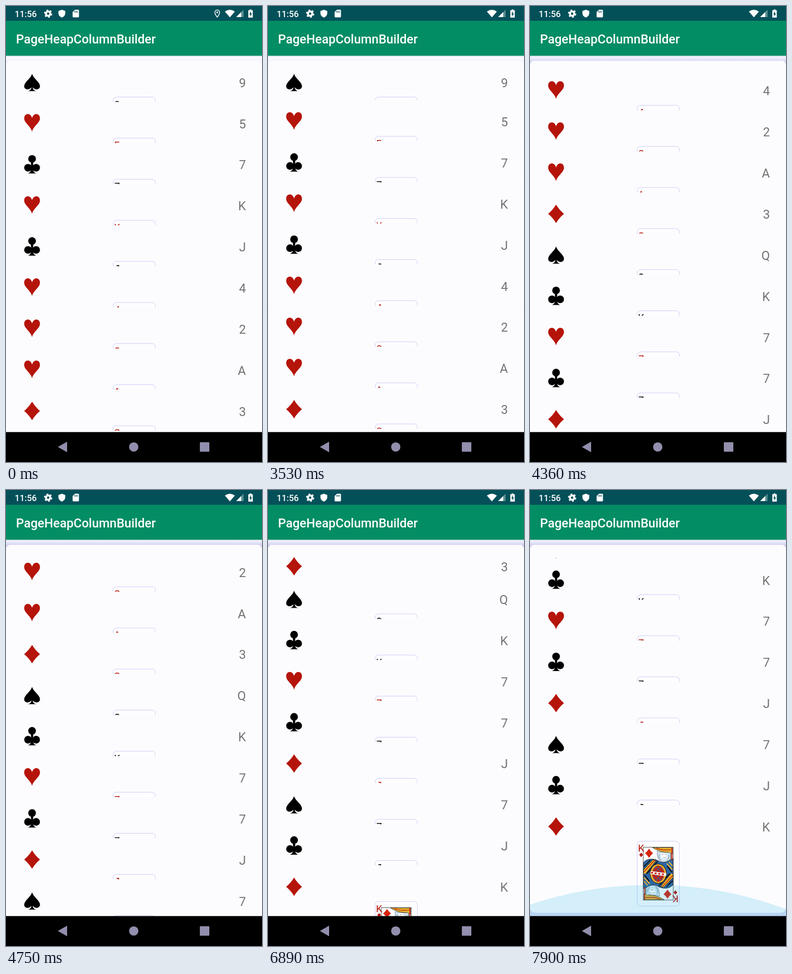
Animation, 486 px wide and 864 px high, one loop 8 s. Source, as an HTML page:

```html
<!DOCTYPE html>
<html lang="en">
<head>
<meta charset="utf-8">
<title>Card list</title>
<style>
  html, body { margin: 0; width: 100%; height: 100%; overflow: hidden; background: #000; }
  svg { display: block; width: 100vw; height: 100vh; }
  text { font-family: Roboto, sans-serif; }
  .value { font-size: 23.6px; fill: #737373; text-anchor: end; }
  .rank { font: 20px "Liberation Mono", monospace; text-anchor: middle; }
  .title { font-size: 23.6px; font-weight: 500; fill: #fff; }
  .clock { font-size: 16.5px; font-weight: 500; fill: #fff; }
</style>
</head>
<body>
<svg viewBox="0 0 486 864">
  <defs>
    <linearGradient id="shade" gradientUnits="userSpaceOnUse" x1="0" y1="95" x2="0" y2="125">
      <stop offset="0" stop-color="#f6f6ff"/>
      <stop offset=".25" stop-color="#d9d9f5"/>
      <stop offset=".5" stop-color="#c2c2dc"/>
      <stop offset="1" stop-color="#dedef8"/>
    </linearGradient>
    <clipPath id="listArea"><rect y="94" width="486" height="714"/></clipPath>
    <clipPath id="halfArea"><rect x="11.5" y="11.5" width="57" height="50"/></clipPath>

    <path id="spade" d="M0-16.5C2-8 15-1 15 7C15 13.5 6 15.5 1.2 9C1.5 13 4 15.500 7.500 16.200H-7.500C-4 15.500-1.500 13-1.200 9C-6 15.500-15 13.500-15 7C-15-1-2-8 0-16.500Z"/>
    <path id="heart" d="M0 15.500C-2.500 4.500-15-1-15-10C-15-20-3-21.500 0-10.500C3-21.500 15-20 15-10C15-1 2.500 4.500 0 15.500Z"/>
    <path id="diamond" d="M0-18Q6-8 15-.5Q6 7 0 17Q-6 7-15-.5Q-6-8 0-18Z"/>
    <g id="club">
      <circle cy="-11" r="7.3"/><circle cx="-7.700" cy="5.800" r="7.3"/><circle cx="7.700" cy="5.800" r="7.3"/>
      <path d="M-2.500-6H2.500L1.500 6C2 13 4 15 8 16.500H-8C-4 15-2 13-1.500 6Z"/>
    </g>

    <g id="kingHalf" clip-path="url(#halfArea)">
      <path d="M29 12H67V24L59 21Q45 22 29 12Z" fill="#e8b230" stroke="#111" stroke-width=".8"/>
      <path d="M36 13Q47 18 64 16" fill="none" stroke="#b5140a" stroke-width="1.200"/>
      <path d="M38 19Q48 23 62 21Q66 31 60 38Q49 42 42 36Q37 29 38 19Z" fill="#d3e8f3" stroke="#456" stroke-width=".6"/>
      <path d="M45 22H56V31Q50 36 46 31Z" fill="#fff"/>
      <path d="M47 25h3M53 25h3M49 31h5M42 24q-3 7 3 12M60 26q1 7-4 11" fill="none" stroke="#456" stroke-width=".7"/>
      <path d="M12 62V40Q22 30 38 36Q49 44 60 37L68 33V62Z" fill="#2b67a8" stroke="#111" stroke-width=".8"/>
      <path d="M12 54L30 35L36 37L16 62H12Z" fill="#e8b230" stroke="#111"/>
      <path d="M13 48L25 36M18 62L39 38" stroke="#111" stroke-width="2"/>
      <path d="M13 58L33 36" stroke="#c7200f" stroke-width="1.500"/>
      <path d="M24 62Q26 44 40 43Q54 44 56 62Z" fill="#e8b230" stroke="#111"/>
      <path d="M28 62Q30 47 40 46Q50 47 52 62Z" fill="#c7200f"/>
      <path d="M30 55L38 47M33 60L45 48M47 60L35 48M50 55L42 47" stroke="#2b67a8" stroke-width="1.200"/>
      <path d="M56 42L67 54M60 39L67 47" stroke="#e8b230" stroke-width="2.200"/>
      <path d="M57 47L66 59" stroke="#111" stroke-width="2"/>
      <path d="M66 12V36" stroke="#c7200f" stroke-width="2"/>
      <path d="M64 24V36" stroke="#111" stroke-width=".7"/>
      <use href="#diamond" transform="translate(22.500 23) scale(.5)" fill="#d8240f"/>
    </g>
  </defs>

  <rect width="486" height="864" fill="#fcfcff"/>
  <g clip-path="url(#listArea)">
    <rect id="shadow" y="95" width="486" height="713" fill="url(#shade)"/>
    <g id="cards"></g>
    <circle id="glow" cx="231" r="729" fill="#00a5d7" fill-opacity=".16"/>
  </g>

  <rect y="28" width="486" height="66.500" fill="#038d64"/>
  <rect y="94.500" width="486" height="1" fill="#cfd8e4"/>
  <text class="title" x="19" y="70.500">PageHeapColumnBuilder</text>

  <rect width="486" height="28" fill="#035059"/>
  <text class="clock" x="16.500" y="20.800">11:56</text>
  <g fill="#fff">
    <circle cx="80" cy="14.500" r="4.100" fill="none" stroke="#fff" stroke-width="3.600"/>
    <circle cx="80" cy="14.500" r="6.700" fill="none" stroke="#fff" stroke-width="2.200" stroke-dasharray="3.500 3.516"/>
    <path d="M106 7L112.500 9.500V14Q112 19.500 106 22Q100 19.500 99.500 14V9.500Z"/>
    <path d="M131 7H137Q138.500 7 138.500 8.500V20Q138.500 21.500 137 21.500H128Q126.500 21.500 126.500 20V11.500Z"/>
    <path d="M130.500 9.500v3M133 9.500v3M135.500 9.500v3" stroke="#035059" stroke-width="1.300"/>
    <g id="pin">
      <path d="M401 21C398 17.500 396.500 14.500 396.500 12A4.500 4.500 0 0 1 405.500 12C405.500 14.500 404 17.500 401 21Z" fill="none" stroke="#fff" stroke-width="1.500"/>
      <circle cx="401" cy="12" r="1.700"/>
    </g>
    <path d="M415.500 10.500Q425 3.500 434.500 10.500L425 21.500Z"/>
    <path d="M451 7V21H437Z" fill-opacity=".35"/>
    <path d="M446.500 11.500V21H437Z"/>
    <path d="M462.500 6.500H466V8H468.500V22H460V8H462.500Z"/>
    <path d="M465 10L461.800 15.800H463.800V20L467 14.200H465Z" fill="#035059"/>
  </g>

  <rect y="807.300" width="486" height="57" fill="#000"/>
  <g fill="#918fad">
    <path d="M98.500 835.500L116 825.500V845.500Z"/>
    <circle cx="242.500" cy="835.500" r="8.800"/>
    <rect x="368" y="826.500" width="18" height="18" rx="1"/>
  </g>
</svg>

<script>
const LOOP = 8000;
const PITCH = 77.85;
const TOP = 104;
const RED = '#b5140a';
const SUITS = { S: 'spade', H: 'heart', D: 'diamond', C: 'club' };
const DECK = '9S 5H 7C KH JC 4H 2H AH 3D QS KC 7H 7C JD 7S JC KD'.split(' ');

// time, scroll offset, speed in px per ms
const SCROLL = [
  [0, 0, 0], [3490, 0, 0], [3970, 236, .46], [4750, 456, .18], [5060, 498, 0],
  [5280, 498, 0], [5410, 499.5, 0], [6410, 499.5, 0], [6890, 638, .36],
  [7200, 752.7, .37], [7201, 752.7, 0], [LOOP, 752.7, 0]
];
const byId = id => document.getElementById(id);

function corner(rank, suit) {
  return `<text class="rank" x="7.5" y="20">${rank}</text>
    <use href="#${suit}" transform="translate(7.5 26) scale(.25)"/>`;
}

function king() {
  return `<use href="#kingHalf"/><use href="#kingHalf" transform="rotate(180 40 61.5)"/>
    <path d="M25 59.5L55 63.5" stroke="#fff" stroke-width="6"/>
    <path d="M26 59.6L54 63.4" stroke="#c7200f" stroke-width="3" stroke-dasharray="4 3"/>
    <rect x="11.5" y="11.5" width="57" height="100" fill="none" stroke="#222" stroke-width=".8"/>`;
}

function card(code) {
  const rank = code[0], suit = SUITS[code[1]];
  const color = 'HD'.includes(code[1]) ? RED : '#000';
  const mark = corner(rank, suit);
  return `<g>
    <rect width="486" height="204" rx="9" fill="#fcfcff"/>
    <use href="#${suit}" x="49.5" y="41" fill="${color}"/>
    <text class="value" x="455.5" y="49.8">${rank}</text>
    <g transform="translate(203.5 68.5)" fill="${color}">
      <rect width="80" height="123" rx="6" fill="#fdfdff" stroke="#cfcdf5"/>
      ${code === 'KD' ? king() : ''}
      ${mark}<g transform="rotate(180 40 61.5)">${mark}</g>
    </g>
  </g>`;
}

function scrollAt(t) {
  const i = SCROLL.findIndex(p => p[0] > t);
  const [t0, y0, v0] = SCROLL[i - 1], [t1, y1, v1] = SCROLL[i];
  const d = t1 - t0, u = (t - t0) / d, w = 1 - u;
  return w * w * (1 + 2 * u) * y0 + u * u * (3 - 2 * u) * y1
    + d * u * w * (w * v0 - u * v1);
}

byId('cards').innerHTML = DECK.map(card).join('');
const cards = [...byId('cards').children];

function draw(t) {
  const scroll = scrollAt(t);
  cards.forEach((el, i) => {
    // the fourth card comes to rest slightly low
    const stop = i === 3 ? TOP + 3 : TOP;
    const y = Math.max(stop, TOP + i * PITCH - scroll);
    el.setAttribute('transform', `translate(0 ${y.toFixed(2)})`);
  });
  byId('shadow').setAttribute('opacity', Math.min(1, .15 + scroll / PITCH * .14));
  byId('pin').setAttribute('visibility', t < 2020 ? 'visible' : 'hidden');

  const pull = Math.min(1, Math.max(0, (t - 7200) / 650));
  const height = 60 * (1 - (1 - pull) ** 2);
  byId('glow').setAttribute('cy', 808 - height + 729);
  byId('glow').setAttribute('visibility', pull > 0 ? 'visible' : 'hidden');
}

const start = performance.now();
function tick() {
  draw((performance.now() - start) % LOOP);
  requestAnimationFrame(tick);
}
tick();
</script>
</body>
</html>
```
